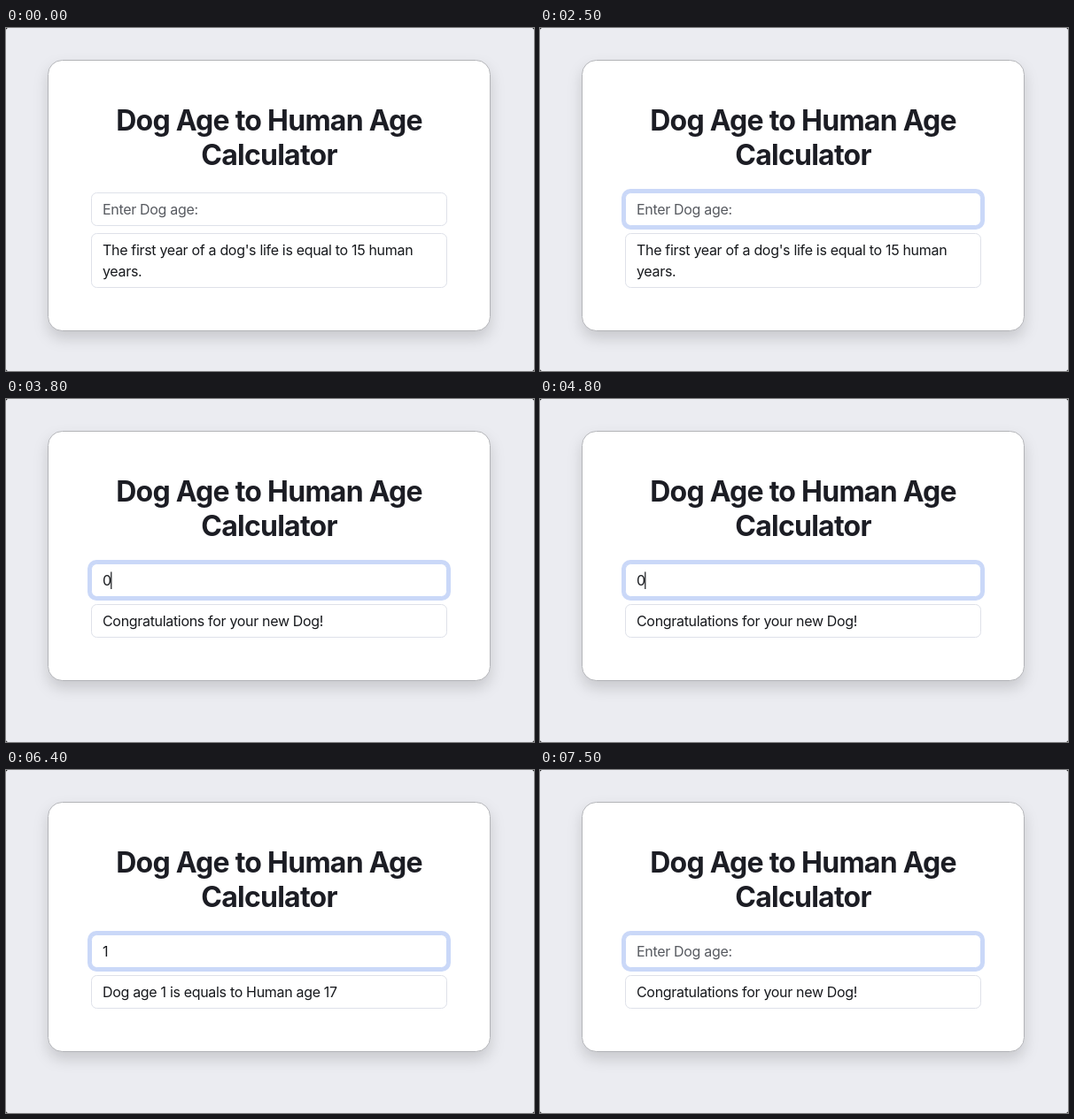
An HTML page for the animation above (8 s loop, 596 px wide and 388 px high).

```html
<!DOCTYPE html>
<html lang="en">
<head>
<meta charset="utf-8">
<title>Dog age calculator</title>
<style>
  html, body { margin: 0; width: 100%; height: 100%; overflow: hidden; background: #000; }
  svg { display: block; width: 596px; height: 388px; }
  text { font: 400 16px Inter, "Liberation Sans", sans-serif; letter-spacing: -0.32px; fill: #17191d; white-space: pre; }
  .title { font-weight: 700; font-size: 32px; letter-spacing: -0.75px; text-anchor: middle; fill: #1c1d24; }
  .card { fill: #fff; stroke: #b3b4b8; filter: drop-shadow(0 8px 8px rgba(0, 0, 0, .15)); }
  .field { fill: #fff; stroke: #dee1e9; }
</style>
</head>
<body>
<svg viewBox="0 0 596 388">
  <rect width="596" height="388" rx="2.5" fill="#ebecf1"/>
  <rect id="card" class="card" x="47.5" y="36.5" width="499" rx="16"/>
  <text class="title" x="297" y="116">Dog Age to Human Age</text>
  <text class="title" x="297" y="154.5">Calculator</text>
  <rect id="ring" x="92" y="182" width="410" height="46" rx="10" fill="#cad8f8"/>
  <rect id="input" class="field" x="96.5" y="186.5" width="401" height="37" rx="6"/>
  <rect id="output" class="field" x="96.5" y="232.5" width="401" rx="6"/>
  <text id="value" x="109" y="211"></text>
  <text id="line1" x="109" y="257"></text>
  <text id="line2" x="109" y="281"></text>
  <rect id="caret" y="195.5" width="1.2" height="19.5" fill="#17191d"/>
</svg>
<script>
const LOOP = 8000;
const el = id => document.getElementById(id);

const intro = ["The first year of a dog's life is equal to 15 human", "years."];
const welcome = ["Congratulations for your new Dog!", ""];
const result = age => [`Dog age ${age} is equals to Human age ${15 + 2 * age}`, ""];

// Each edit: start time, typed value, message lines
const edits = [
  [0, "", intro],
  [3800, "0", welcome],
  [5200, "", welcome],
  [5900, "1", result(1)],
  [6500, "", welcome],
  [7000, "2", result(2)],
  [7500, "", welcome]
];
const caretOn = [[2000, 2500], [3000, 3500], [3800, 4300], [4800, 5300],
                 [5800, 6400], [6900, 7400]];

function render(t) {
  const [, value, lines] = edits.filter(e => e[0] <= t).pop();
  const tall = lines[1] !== "";
  el("card").setAttribute("height", tall ? 306 : 282);
  el("output").setAttribute("height", tall ? 61 : 37);

  const focus = t < 2000 ? 0 : t < 2100 ? 0.12 : 1;
  el("ring").setAttribute("opacity", focus === 1 ? 1 : 0);
  el("input").style.stroke = focus === 0 ? "" : focus === 1 ? "#cad8f8" : "#d3d9ee";

  el("value").textContent = value || "Enter Dog age:";
  el("value").style.fill = value ? "" : "#575a60";
  el("line1").textContent = lines[0];
  el("line2").textContent = lines[1];

  const shown = caretOn.some(([from, to]) => t >= from && t < to);
  el("caret").setAttribute("opacity", shown ? 1 : 0);
  el("caret").setAttribute("x", value ? 118.2 : 108.8);
}

const start = performance.now();
function tick() {
  render((performance.now() - start) % LOOP);
  requestAnimationFrame(tick);
}
tick();
</script>
</body>
</html>
```
